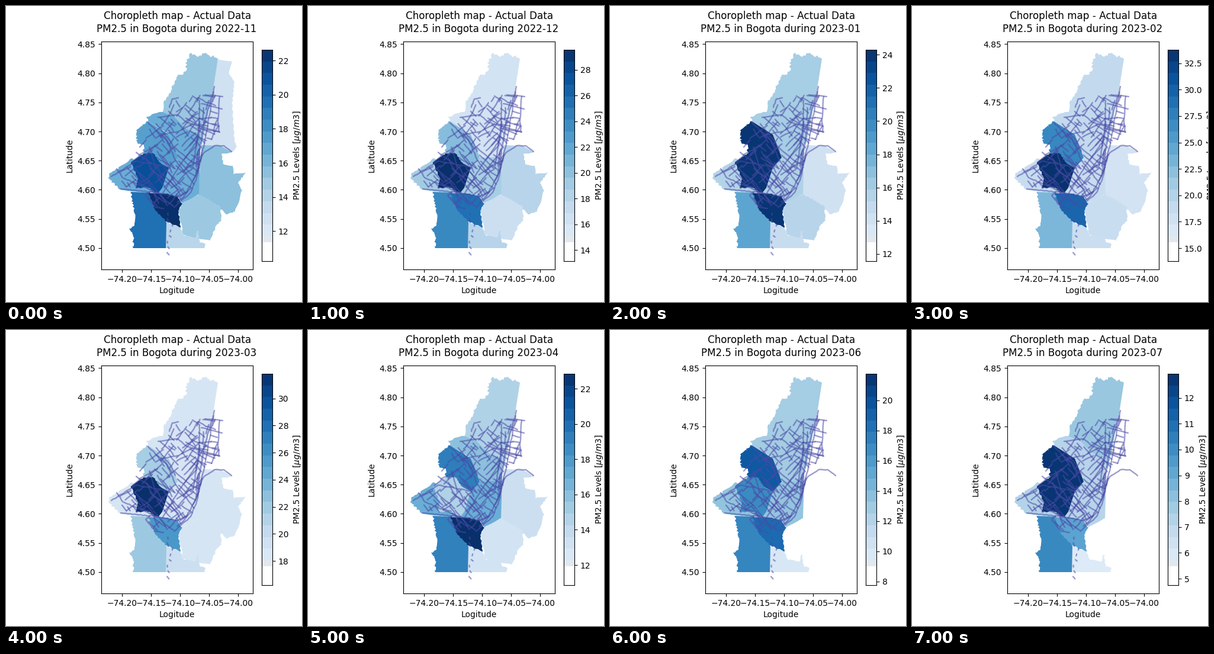
Write a matplotlib script that moves like this. It is 500 px wide and 500 px high and loops after 8000 ms.

```python
import math
import random

import numpy as np
import matplotlib.pyplot as plt
from matplotlib.animation import FuncAnimation
from matplotlib.collections import LineCollection
from matplotlib.patches import Polygon, Rectangle
from matplotlib.path import Path

SIZE = 500
NONE = math.nan
plt.rcParams["font.family"] = "DejaVu Sans"
blues = plt.get_cmap("Blues")
rng = random.Random(7)

# month, lowest value, highest value
MONTHS = [
    ("2022-11", 10.23, 22.64), ("2022-12", 13.14, 29.54),
    ("2023-01", 11.57, 24.29), ("2023-02", 13.77, 33.77),
    ("2023-03", 16.21, 31.82), ("2023-04", 10.86, 22.84),
    ("2023-06", 7.75, 21.75), ("2023-07", 4.75, 12.93),
]

fig = plt.figure(figsize=(5, 5), dpi=100, facecolor="white")


def pixel_axes(left, top, right, bottom):
    return fig.add_axes([left / SIZE, 1 - bottom / SIZE,
                         (right - left) / SIZE, (bottom - top) / SIZE])


def rough(points, amp, step=2.5):
    """Split a path into short pieces and shake them by position."""
    out = [points[0]]
    for (x0, y0), (x1, y1) in zip(points, points[1:]):
        n = max(1, round(math.hypot(x1 - x0, y1 - y0) / step))
        for i in range(1, n):
            x, y = x0 + (x1 - x0) * i / n, y0 + (y1 - y0) * i / n
            out.append((x + amp * math.sin(12.9 * x + 7.3 * y),
                        y + amp * math.sin(5.1 * x + 17.7 * y)))
        out.append((x1, y1))
    return out


# --- map -----------------------------------------------------------------
ax = pixel_axes(161, 60, 417, 445)
ax.set_xlim(161, 417)
ax.set_ylim(445, 60)
ax.set_xticks([196.3 + 49 * i for i in range(5)],
              [f"\u2212{74.2 - 0.05 * i:.2f}" for i in range(5)])
ax.set_yticks([408.72 - 49.18 * i for i in range(8)],
              [f"{4.5 + 0.05 * i:.2f}" for i in range(8)])
ax.set_xlabel("Logitude")
ax.set_ylabel("Latitude")
fig.text(289.5 / SIZE, 1 - 22 / SIZE, "Choropleth map - Actual Data",
         size=12.05, ha="center")
title = fig.text(288.6 / SIZE, 1 - 44 / SIZE, "", size=12.05, ha="center")

regions = []


def region(levels, jagged, straight=(), amp=1.5):
    """Levels skip the 4th and 7th month, which lie between their neighbours."""
    nov, dec, jan, mar, apr, jul = levels
    levels = nov, dec, jan, (jan + mar) / 2, mar, apr, (apr + jul) / 2, jul
    patch = Polygon(rough(jagged, amp) + list(straight), lw=0, zorder=1)
    ax.add_patch(patch)
    regions.append((patch, levels))


# north-east strip
region([.2] + [NONE] * 5,
       [(358, 90), (381, 93), (377, 115), (386, 128), (382, 165),
        (386, 230), (390, 237), (382, 247)],
       [(362, 236), (332, 236)], .8)
# north
region([.39, .19, .35, .17, .32, .39],
       [(263, 180), (266, 163), (280, 138), (290, 118), (304, 110), (305, 90),
        (313, 79), (324, 86), (335, 80), (358, 89)],
       [(350, 140), (331, 235), (300, 205)], 2)
# north-west
region([.5, .19, .35, .17, .42, .3],
       [(240, 195), (237, 187), (264, 179)],
       [(285, 188), (303, 207), (328, 218), (328, 260), (290, 262),
        (275, 216)])
# east
region([.42, .3, .2, .17, .22, NONE],
       [(382, 247), (364, 250), (367, 267), (383, 270), (384, 284),
        (405, 281), (392, 299), (399, 312), (387, 347), (372, 352),
        (359, 338), (325, 319)],
       [(330, 235), (362, 236)], .8)
# south-east
region([.38, .22, .3, .17, .19, NONE],
       [(326, 318), (362, 338), (364, 362), (355, 371), (345, 396),
        (318, 392), (300, 387), (291, 346), (298, 333)], (), .8)
# far south
region([.29, .3, .24, .22, .19, .13],
       [(271, 365), (295, 374), (300, 388), (320, 391), (324, 379),
        (327, 399), (337, 402)],
       [(335, 409), (267, 409)], .8)
# centre
region([.5, .35, .32, .17, .5, .3],
       [(326, 318), (298, 333), (290, 322), (257, 316)],
       [(268, 290), (275, 272), (290, 256), (328, 255)], .6)
# west
region([.5, .36, .31, .17, .5, .31],
       [(192, 310), (173, 290), (174, 283), (190, 276), (212, 257)],
       [(235, 270), (257, 316), (211, 313)], 2)
# mid west
region([.56, .43, .98, .35, .7, .98],
       [(232, 249), (233, 237), (222, 233), (220, 210), (240, 195)],
       [(275, 217), (290, 256), (275, 273), (255, 262)], 2)
# inner west
region([.88, 1, .98, 1, .32, .98],
       [(257, 316), (238, 306), (219, 308), (223, 292), (211, 264),
        (232, 249), (248, 248), (262, 266)],
       [(275, 273), (264, 307)], 1)
# south-west
region([.75, .66, .54, .38, .69, .66],
       [(215, 409), (215, 390), (208, 376), (217, 371), (217, 350), (211, 314)],
       [(243, 315), (266, 350), (271, 366), (270, 409)])
# south centre
region([1, .75, .98, .6, 1, .55],
       [(271, 317), (290, 322), (298, 334), (291, 346), (295, 374),
        (271, 364), (252, 345), (241, 316)], (), .8)

# --- roads ---------------------------------------------------------------
CITY = Path([(178, 286), (205, 262), (235, 212), (262, 186), (290, 156),
             (354, 146), (361, 210), (335, 242), (318, 305), (284, 340),
             (244, 338), (238, 312), (190, 304)])


def street(x, y):
    """Walk along or across the local slant until the city ends."""
    slant = 38 + 42 / (1 + math.exp((312 - x) / 9))
    angle = math.radians(-slant + rng.choice((0, 90)) + rng.uniform(-8, 8))
    points = []
    for _ in range(rng.randint(4, 11)):
        if not CITY.contains_point((x, y)):
            break
        points.append((x, y))
        angle += rng.uniform(-.16, .16)
        x, y = x + 4 * math.cos(angle), y + 4 * math.sin(angle)
    return points


AVENUES = [
    [(352, 136), (337, 222), (322, 290), (312, 315), (284, 340)],
    [(350, 145), (334, 200), (321, 285), (306, 313)],
    [(315, 152), (327, 160), (326, 205), (316, 270)],
    [(336, 150), (366, 153)],
    [(330, 165), (365, 174)],
    [(361, 153), (358, 192), (360, 213), (324, 206)],
    [(325, 268), (334, 248), (352, 236), (368, 236), (381, 246)],
    [(257, 188), (290, 184), (306, 197), (361, 213)],
    [(291, 155), (281, 157), (276, 171)],
    [(240, 197), (272, 228), (286, 260), (318, 301)],
    [(325, 225), (294, 268), (264, 318)],
    [(178, 288), (220, 262), (275, 272)],
    [(187, 275), (197, 290), (257, 316)],
    [(194, 309), (243, 314), (289, 322), (306, 314)],
    [(243, 314), (236, 320), (252, 340), (266, 342)],
]

roads = [rough(points, .5, 4) for points in AVENUES]
for gx in range(180, 362, 12):
    for gy in range(152, 340, 12):
        walk = street(gx + rng.uniform(-4, 4), gy + rng.uniform(-4, 4))
        if len(walk) > 2:
            roads.append(walk)

# loose stretches south of the city
for i in range(8):
    x, y = 277 + rng.uniform(-5, 5), 350 + 9.5 * i
    roads.append([(x, y), (x + rng.uniform(-1, 4), y + rng.uniform(2, 6))])

ax.add_collection(LineCollection(roads, colors="#4a4aa6", alpha=.55,
                                 linewidths=1.7, capstyle="round", zorder=2),
                  autolim=False)

# --- colour bar ----------------------------------------------------------
cax = pixel_axes(432, 74, 450, 431)
cax.set_xticks([])
cax.yaxis.tick_right()
cax.yaxis.set_label_position("right")
cax.set_ylabel(r"PM2.5 Levels [$\mu g/m3$]")


def band(low, high, color):
    cax.add_patch(Rectangle((0, low), 1, high - low, color=color, lw=0,
                            transform=cax.transAxes))


band(0, .09, "white")
band(.09, .118, "#e3e8ee")
edges = np.linspace(.118, 1, 17)
for low, high in zip(edges, edges[1:]):
    band(low, high, blues((low + high) / 2))


def draw(i):
    month, low, high = MONTHS[i]
    title.set_text(f"PM2.5 in Bogota during {month}")
    cax.set_ylim(low, high)
    for patch, levels in regions:
        patch.set_visible(not math.isnan(levels[i]))
        patch.set_facecolor(blues(float(levels[i])))
    return []


anim = FuncAnimation(fig, draw, frames=len(MONTHS), init_func=lambda: draw(0),
                     interval=1000, repeat=True, repeat_delay=0, blit=False)
plt.show()
```
